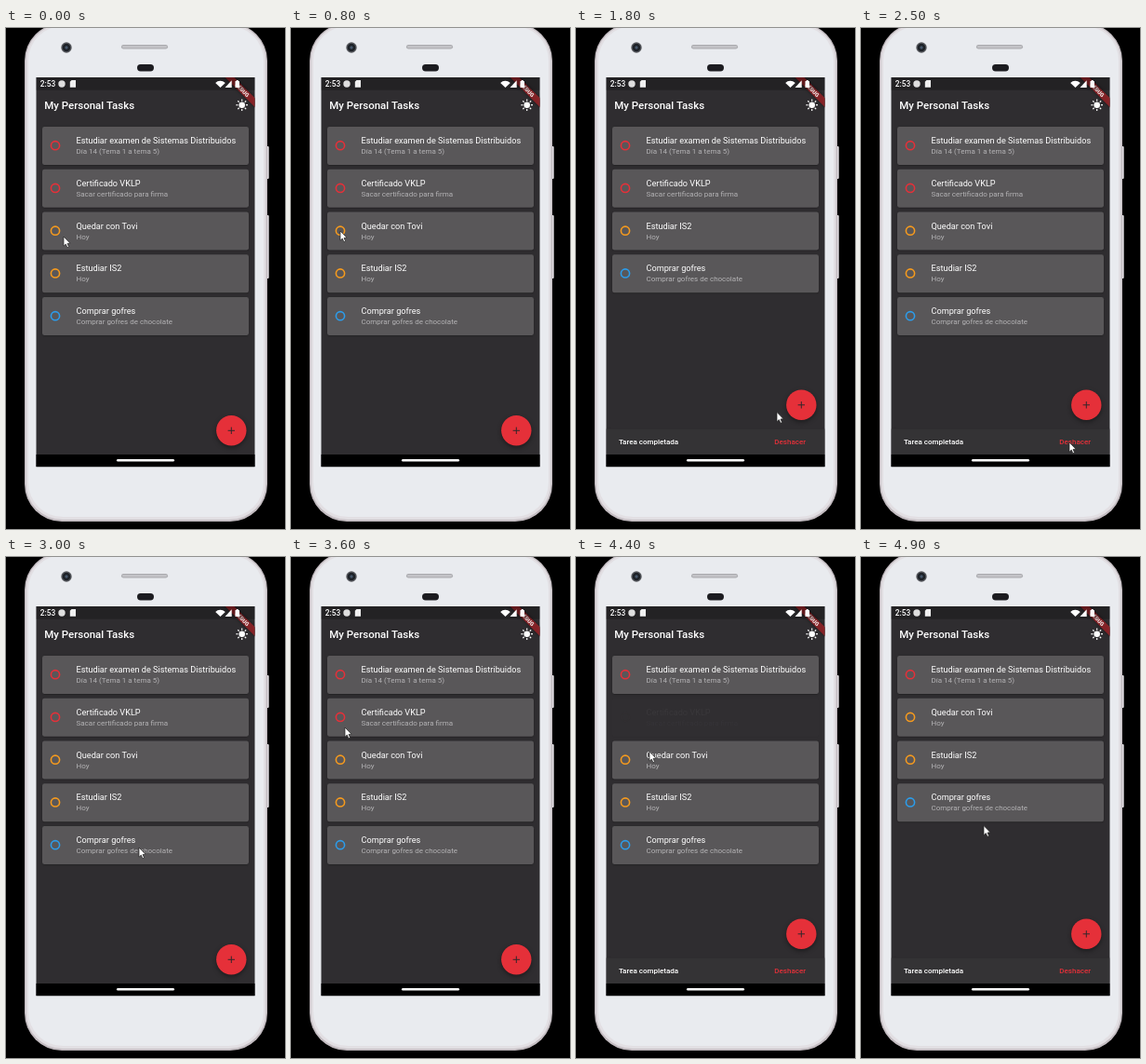
Animation, 300 px wide and 538 px high, one loop 5000 ms. Source, as an HTML page with a canvas:

```html
<!DOCTYPE html>
<html lang="es">
<head>
<meta charset="utf-8">
<title>My Personal Tasks</title>
<style>
  html, body { margin: 0; width: 100%; height: 100%; overflow: hidden; background: #000; }
  canvas { display: block; width: 300px; height: 538px; }
</style>
</head>
<body>
<canvas id="stage"></canvas>
<script>
const W = 300, H = 538, LOOP = 5000, STEP = 100;
const canvas = document.getElementById('stage');
const ctx = canvas.getContext('2d');
const dpr = window.devicePixelRatio || 1;
canvas.width = W * dpr;
canvas.height = H * dpr;

const RED = '#e53039', ORANGE = '#f59a1e', BLUE = '#2c9cea';
const BG = '#2f2d30', CARD = '#595759';
const LEFT = 32.5, TOP = 53, WIDTH = 235, RIGHT = LEFT + WIDTH;
const PITCH = 45.75, SNACK_H = 27.5, NAV_Y = 458;

const tasks = [
  { title: 'Estudiar examen de Sistemas Distribuidos', note: 'Día 14 (Tema 1 a tema 5)', color: RED },
  { title: 'Certificado VKLP', note: 'Sacar certificado para firma', color: RED },
  { title: 'Quedar con Tovi', note: 'Hoy', color: ORANGE },
  { title: 'Estudiar IS2', note: 'Hoy', color: ORANGE },
  { title: 'Comprar gofres', note: 'Comprar gofres de chocolate', color: BLUE }
];

const DONE_A = 935, UNDO = 2500, DONE_B = 4040;
const FADE = 415, SHRINK = 330, SLIDE = 250;

// Pointer stops: time, x, y
const pointer = [
  [0, 62, 224], [500, 53, 218], [950, 53, 218], [1300, 170, 340.5],
  [1800, 216, 412.5], [2200, 224, 445], [2500, 224, 445], [3000, 143, 312],
  [3600, 58, 183], [3900, 53, 174], [4200, 53, 174], [4800, 131, 279], [4900, 132, 288.5]
];

const clamp = v => Math.min(1, Math.max(0, v));
const smooth = v => { v = clamp(v); return v * v * (3 - 2 * v); };

function box(x, y, w, h, r, fill) {
  ctx.beginPath();
  ctx.roundRect(x, y, w, h, r);
  ctx.fillStyle = fill;
  ctx.fill();
}

function disc(x, y, r, fill) {
  ctx.beginPath();
  ctx.arc(x, y, r, 0, Math.PI * 2);
  ctx.fillStyle = fill;
  ctx.fill();
}

function poly(points, fill, stroke) {
  ctx.beginPath();
  points.forEach(([x, y]) => ctx.lineTo(x, y));
  ctx.closePath();
  ctx.fillStyle = fill;
  ctx.fill();
  if (stroke) {
    ctx.strokeStyle = stroke;
    ctx.lineWidth = 0.7;
    ctx.stroke();
  }
}

function line(x1, y1, x2, y2, color, width) {
  ctx.beginPath();
  ctx.moveTo(x1, y1);
  ctx.lineTo(x2, y2);
  ctx.strokeStyle = color;
  ctx.lineWidth = width;
  ctx.stroke();
}

function text(str, x, y, size, color, weight = 400) {
  ctx.font = `${weight} ${size}px Roboto, sans-serif`;
  ctx.fillStyle = color;
  ctx.fillText(str, x, y);
}

function shadow(color, blur, dy) {
  ctx.shadowColor = color;
  ctx.shadowBlur = blur * dpr;
  ctx.shadowOffsetY = dy * dpr;
}

function clipRect(x, y, w, h) {
  ctx.beginPath();
  ctx.rect(x, y, w, h);
  ctx.clip();
}

function drawPhone() {
  box(279, 127, 3.7, 35, 1, '#e0dce0');
  box(279, 201, 3.7, 68, 1, '#e0dce0');
  box(20, -5, 261, 535, 40, '#c4bdc2');
  box(21.5, -4, 258, 532, 39, '#e2dfe3');
  box(24, -2, 253, 527, 37, '#e9ebef');
  disc(65, 21, 5.7, '#55575c');
  disc(65, 21, 4.3, '#1d2127');
  disc(65, 21, 1.7, '#46566a');
  box(124, 18, 50, 4.6, 2.3, '#a9a9ad');
  box(125, 19, 48, 2.6, 1.3, '#c3c3c7');
  box(141, 39, 18, 7.5, 3.7, '#1c1c20');
}

function drawBanner() {
  ctx.save();
  clipRect(LEFT, TOP, WIDTH, 405);
  ctx.translate(RIGHT, TOP);
  ctx.rotate(Math.PI / 4);
  shadow('rgba(0,0,0,.5)', 3.4, 0);
  box(-23, 15.6, 46, 6.9, 0, '#842226');
  shadow('transparent', 0, 0);
  ctx.textAlign = 'center';
  text('DEBUG', 0, 21.1, 5.8, '#f4e8e8', 900);
  ctx.restore();
}

function drawStatusBar() {
  box(LEFT, TOP, WIDTH, 13.7, 0, 'rgba(0,0,0,.25)');
  text('2:53', 36.8, 63, 8.3, '#fff', 500);
  disc(60, 60, 3.7, '#dedede');
  poly([[70.5, 56], [75, 56], [75, 63.8], [68.8, 63.8], [68.8, 57.8]], '#f0f0f0');
  ctx.beginPath();
  ctx.moveTo(230.5, 64);
  ctx.arc(230.5, 64, 7.3, -Math.PI * 0.76, -Math.PI * 0.24);
  ctx.closePath();
  ctx.fillStyle = '#fff';
  ctx.fill();
  poly([[235.5, 64], [242.7, 64], [242.7, 56.3]], '#fff');
  box(246.5, 57, 4.5, 7, 0.6, '#fff');
  box(247.7, 56, 2, 1.5, 0, '#fff');
}

function drawSun(x, y) {
  disc(x, y, 3.3, '#fff');
  for (let i = 0; i < 8; i++) {
    const a = i * Math.PI / 4, c = Math.cos(a), s = Math.sin(a);
    line(x + c * 4.3, y + s * 4.3, x + c * 6.3, y + s * 6.3, '#fff', 1.2);
  }
}

function drawTask(task, y, alpha, done) {
  ctx.save();
  ctx.globalAlpha = alpha;
  shadow('rgba(0,0,0,.4)', 1.5, 0.6);
  box(39, y, 222, 41, 2.3, CARD);
  shadow('transparent', 0, 0);
  if (done) disc(53, y + 20.2, 5, '#4a4445');
  ctx.beginPath();
  ctx.arc(53, y + 20.2, 4.6, 0, Math.PI * 2);
  ctx.strokeStyle = done ? '#5a3a38' : task.color;
  ctx.lineWidth = 1.6;
  ctx.stroke();
  text(task.title, 75.5, y + 18.1, 9.17, '#fff');
  text(task.note, 75.5, y + 29.2, 8, '#b4b3b5');
  ctx.restore();
}

function drawList(t) {
  const first = t < UNDO;
  const gone = first ? 2 : 1;
  const ms = t - (first ? DONE_A : DONE_B);
  const fade = 1 - smooth(ms / FADE);
  const slot = 1 - smooth((ms - FADE) / SHRINK);
  let y = 106;
  tasks.forEach((task, i) => {
    const out = i === gone;
    if (!out || fade > 0) drawTask(task, y, out ? fade : 1, out && ms >= 0);
    y += PITCH * (out ? slot : 1);
  });
}

function snackOpen(t) {
  if (t < UNDO) return smooth((t - DONE_A) / SLIDE);
  if (t < DONE_B) return 1 - smooth((t - UNDO) / SLIDE);
  return smooth((t - DONE_B) / SLIDE);
}

function drawSnack(k) {
  if (k <= 0) return;
  const top = NAV_Y - SNACK_H * k;
  ctx.save();
  clipRect(LEFT, 380, WIDTH, NAV_Y - 380);
  shadow('rgba(0,0,0,.35)', 3, 0);
  box(LEFT, top, WIDTH, SNACK_H, 0, '#343335');
  shadow('transparent', 0, 0);
  ctx.globalAlpha = clamp(k * 2 - 1);
  text('Tarea completada', 45.9, top + 16, 8, '#fff', 500);
  text('Deshacer', 213.3, top + 16, 8, RED, 500);
  ctx.restore();
}

function drawFab(k) {
  const x = 242.3, y = 432.3 - SNACK_H * k;
  ctx.save();
  shadow('rgba(0,0,0,.4)', 5, 2);
  disc(x, y, 16.2, RED);
  ctx.restore();
  line(x - 3.7, y, x + 3.7, y, '#33272b', 1);
  line(x, y - 3.7, x, y + 3.7, '#33272b', 1);
}

function drawPointer(t) {
  let i = 0;
  while (i < pointer.length - 2 && t > pointer[i + 1][0]) i++;
  const [t0, x0, y0] = pointer[i], [t1, x1, y1] = pointer[i + 1];
  const k = clamp((t - t0) / (t1 - t0));
  ctx.save();
  ctx.translate(x0 + (x1 - x0) * k, y0 + (y1 - y0) * k);
  poly([[0, 0], [0, 10.2], [2.3, 8.1], [3.9, 11.8], [5.6, 11], [4, 7.5], [7, 7.2]], '#fff', '#222');
  ctx.restore();
}

function draw(t) {
  ctx.setTransform(dpr, 0, 0, dpr, 0, 0);
  box(0, 0, W, H, 0, '#000');
  drawPhone();
  box(LEFT, TOP, WIDTH, 418, 0, BG);
  drawBanner();
  drawStatusBar();
  text('My Personal Tasks', 41.3, 87, 11.47, '#fff', 500);
  drawSun(253.7, 82.7);
  drawList(t);
  const k = snackOpen(t);
  drawSnack(k);
  drawFab(k);
  box(LEFT, NAV_Y, WIDTH, 13.3, 0, '#000');
  box(119, 463, 62, 2.4, 1.2, '#fff');
  drawPointer(t);
}

const start = performance.now();
function tick() {
  const t = (performance.now() - start) % LOOP;
  draw(Math.floor(t / STEP) * STEP);
  requestAnimationFrame(tick);
}
tick();
</script>
</body>
</html>
```
